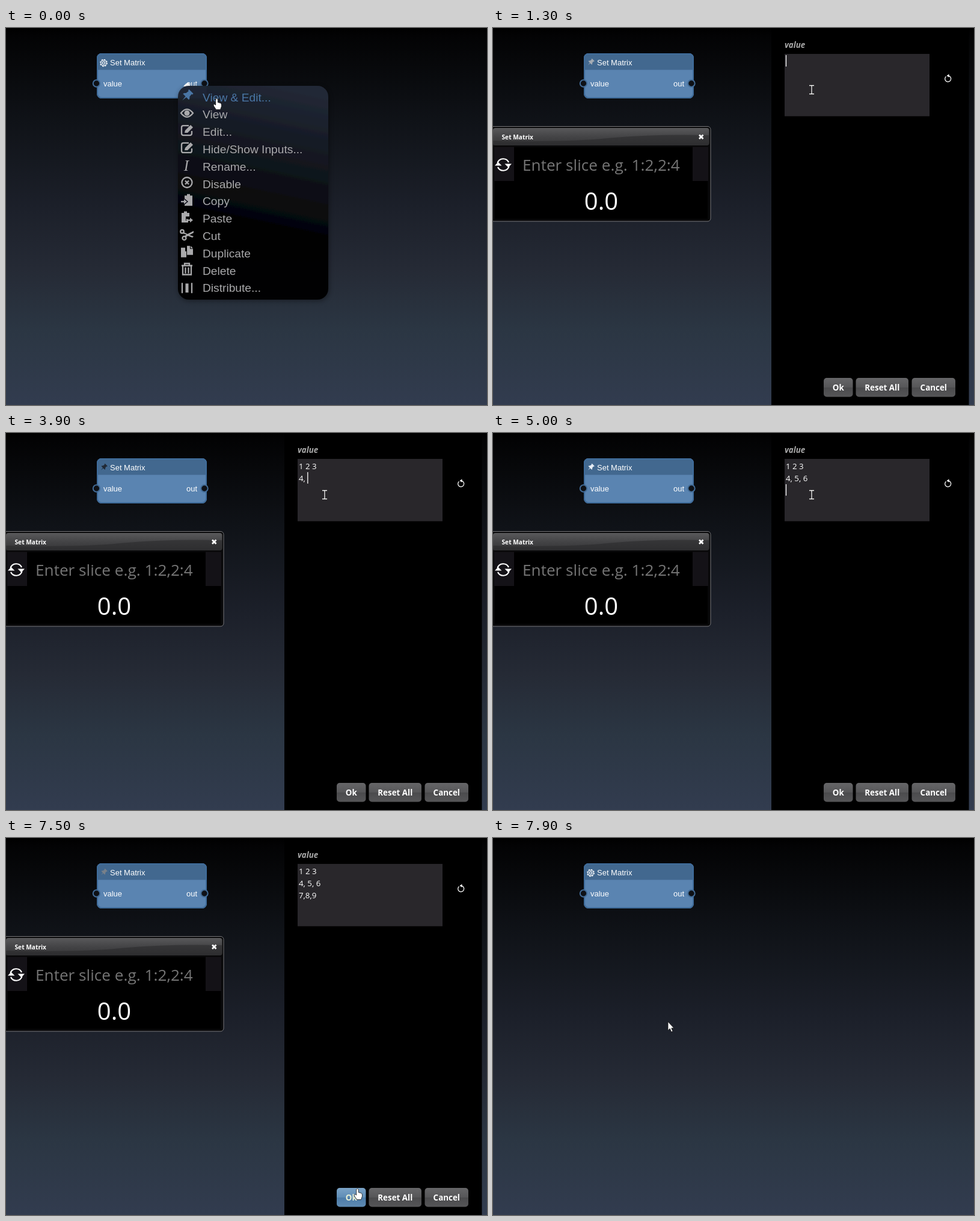
Write an HTML page that moves like this. It is 800 by 626 pixels and loops after 8 s.

```html
<!DOCTYPE html>
<html lang="en">
<head>
<meta charset="utf-8">
<title>Matrix node editor</title>
<style>
html, body { margin: 0; width: 100%; height: 100%; overflow: hidden; background: #000; }
svg { display: block; }
text { white-space: pre; fill: #fff; }
.node text { font: 13px "Liberation Sans", Arial, sans-serif; }
.ui { font-family: "Open Sans", "Noto Sans", sans-serif; }
.b { font-weight: 700; }
#menu text { font: 19.2px "Liberation Sans", Arial, sans-serif; fill: inherit; }
#menu text.serif { font: italic 25px "Liberation Serif", Times, serif; }
.line { fill: none; stroke: currentColor; stroke-width: 2.3; }
.cursor { fill: #fff; stroke: #111; stroke-width: .8; }
</style>
</head>
<body>
<svg width="800" height="626" viewBox="0 0 800 626">
  <defs>
    <linearGradient id="sky" x2="0" y2="1">
      <stop stop-color="#000"/><stop offset=".02" stop-color="#030304"/>
      <stop offset=".24" stop-color="#0f1217"/><stop offset=".48" stop-color="#1c202a"/>
      <stop offset=".64" stop-color="#252a35"/><stop offset=".8" stop-color="#2b3643"/>
      <stop offset="1" stop-color="#323c4f"/>
    </linearGradient>
    <linearGradient id="menuFill" x1=".6" x2=".45" y2="1">
      <stop stop-color="#222937"/><stop offset=".3" stop-color="#131720"/>
      <stop offset=".68" stop-color="#010102"/><stop offset="1" stop-color="#000"/>
    </linearGradient>
    <linearGradient id="bar" x2="0" y2="1">
      <stop stop-color="#59595b"/><stop offset=".5" stop-color="#444446"/><stop offset="1" stop-color="#343436"/>
    </linearGradient>
    <linearGradient id="btn" x2="0" y2="1">
      <stop stop-color="#666668"/><stop offset=".5" stop-color="#565658"/>
      <stop offset=".52" stop-color="#4b4b4d"/><stop offset="1" stop-color="#565658"/>
    </linearGradient>
    <linearGradient id="btnHot" x2="0" y2="1">
      <stop stop-color="#7ba3c6"/><stop offset=".5" stop-color="#5f8db6"/>
      <stop offset=".52" stop-color="#4d7ca8"/><stop offset="1" stop-color="#5f8bb3"/>
    </linearGradient>
    <filter id="shadow" x="-10%" y="-10%" width="120%" height="120%">
      <feDropShadow dx="1" dy="2" stdDeviation="4" flood-opacity=".4"/>
    </filter>
    <clipPath id="reveal"><rect id="revealBox" x="463" width="330" height="626"/></clipPath>
    <clipPath id="nodeClip"><rect x="151" y="42" width="183" height="75" rx="8"/></clipPath>
    <path id="pinShape" d="M-5-10H5V-7.5H3.5L4.2-2Q7 0 7 2.5H1L0 11L-1 2.5H-7Q-7 0-4.2-2L-3.5-7.5H-5Z" transform="rotate(45)"/>
  </defs>
  <rect width="800" height="626" fill="url(#sky)"/>

  <g class="node">
    <g clip-path="url(#nodeClip)">
      <path d="M151 42h183v75h-183z" fill="#5a84b1"/>
      <path d="M151 42h183v27.5h-183z" fill="#42688f"/>
    </g>
    <rect x="152" y="43" width="181" height="73" rx="7" fill="none" stroke="#3f6c9b" stroke-width="2"/>
    <g fill="#0e1116" stroke="#426b96" stroke-width="2">
      <circle cx="150.5" cy="92" r="5.7"/><circle cx="330" cy="92" r="5.7"/>
    </g>
    <text x="173" y="62">Set Matrix</text>
    <text x="162" y="97">value</text>
    <text x="318" y="97" text-anchor="end">out</text>
    <g id="gear" fill="none" stroke="#fff" transform="translate(162.5 58)">
      <circle r="2.1" stroke-width="1.1"/><circle r="4.6" stroke-width="1.1"/>
      <circle r="5.7" stroke-width="1.4" stroke-dasharray="2.2 2.277"/>
    </g>
    <use id="pin" href="#pinShape" transform="translate(162.5 57) scale(.6)"/>
  </g>

  <g id="viewer" class="ui">
    <rect x="-4" y="163.5" width="366" height="157.5" rx="5" fill="#080809" stroke="#77777a"/>
    <rect x="0" y="166" width="359.5" height="29" rx="4" fill="url(#bar)"/>
    <path d="M0 187Q120 190 190 183T359 178V191Q359 195 355 195H0Z" fill="#29292b" opacity=".55"/>
    <text class="b" x="14.5" y="184.5" font-size="10.2">Set Matrix</text>
    <path d="M343 177.500l6.500 6.500m0-6.500l-6.500 6.500" stroke="#fff" stroke-width="2.800"/>
    <path d="M2 197.500H358V254H2Z" fill="#141217"/>
    <path d="M35 197.500H332V254H35ZM3 254H357V317H3Z"/>
    <path d="M7.500 224A10 10 0 0 1 26 223M26.500 230A10 10 0 0 1 8 231" fill="none" stroke="#fff" stroke-width="2.200"/>
    <path d="M19.500 225.500H31L25.500 231.500ZM3 228.500H14.500L8.500 222.500Z" fill="#fff"/>
    <text x="49" y="237" font-size="26.2" style="fill:#757575">Enter slice e.g. 1:2,2:4</text>
    <text x="180" y="302" font-size="40" text-anchor="middle">0.0</text>
  </g>

  <g id="dialog" class="ui" clip-path="url(#reveal)">
    <path d="M463 0H791.500V626H463Z"/>
    <text class="b" x="485" y="33" font-size="13.3" font-style="italic" style="fill:#aaa">value</text>
    <path d="M485 43H726V146.500H485Z" fill="#29272b"/>
    <g id="lines" font-size="13.3"></g>
    <path id="caret" d="M0 0V19" stroke="#fff" stroke-width="1.3"/>
    <path d="M753.500 80.500A5 5 0 1 0 758 79.500" fill="none" stroke="#fff" stroke-width="1.300"/>
    <path d="M758.500 76.500V82L754.500 79.200Z" fill="#fff"/>
    <g id="buttons"></g>
  </g>

  <g id="menu">
    <path d="M295 97Q300 90 304 91L306 97Z" fill="#fff"/>
    <rect x="286" y="96" width="250" height="355" rx="18" fill="url(#menuFill)" opacity=".96" filter="url(#shadow)"/>
  </g>

  <g class="cursor">
    <path id="arrow" d="M0 0V14.500L3.300 11.500L5.500 17L8 16L5.800 10.800H10Z"/>
    <path id="hand" d="M-1.800 1.500Q0-1 1.800 1.500V6.500L6 7.500Q8 8.200 8 11V13L6 18.500H-1L-5 12.500Q-6 9.500-4 9.500L-1.800 11Z"/>
    <g id="beam" fill="none">
      <path d="M-4-7H4M0-7V7M-4 7H4" stroke="#000" stroke-width="3" opacity=".5"/>
      <path d="M-4-7H4M0-7V7M-4 7H4" stroke="#fff" stroke-width="1.300"/>
    </g>
  </g>
</svg>
<script>
const $ = id => document.getElementById(id);
const show = (id, on) => $(id).style.display = on ? '' : 'none';
const clamp = (v, lo = 0, hi = 1) => Math.min(hi, Math.max(lo, v));
const mix = (a, b, k) => a + (b - a) * k;
const swing = k => .5 - Math.cos(clamp(k) * Math.PI) / 2;

const LOOP = 8000, END = 7900;
const OPEN = 100, SLIDE = 120, FOCUS = 1200, TYPE = 1900, KEY = 230, BLUR = 7300;
const TEXT = '1 2 3\n4, 5, 6\n7,8,9';

// Menu entries with icons drawn around their own centre
const solid = d => `<path d="${d}" fill="currentColor"/>`;
const line = d => `<path d="${d}" class="line"/>`;
const ring = (x, y, r) => `<circle cx="${x}" cy="${y}" r="${r}" class="line"/>`;
const edit = line('M3-8H-6Q-9-8-9-5V5Q-9 8-6 8H5Q8 8 8 5V1') + solid('M-4 4L-3 0L6-9L10-5L1 4Z');
const items = [
  ['View & Edit...', '<use href="#pinShape" fill="currentColor"/>'],
  ['View', line('M-10 0Q0-13 10 0Q0 13-10 0Z') + solid('M-4.500 0A4.500 4.500 0 0 1 4.500 0A4.500 4.500 0 0 1-4.500 0Z')],
  ['Edit...', edit],
  ['Hide/Show Inputs...', edit],
  ['Rename...', '<text class="serif" x="-1" y="9" text-anchor="middle">I</text>'],
  ['Disable', ring(0, 0, 8.5) + line('M-3-3L3 3M3-3L-3 3')],
  ['Copy', solid('M-4-7H0V-9.500H5V-7H9V10H-4V8L2 3L-4-2Z') + line('M-10 3H-3') + solid('M-5-1L0 3L-5 7Z')],
  ['Paste', solid('M-9-7H-5V-9.500H0V-7H4V-1H-2V6H2V9H-9Z') + line('M0 3V5H6') + solid('M5 1L10 5L5 9Z')],
  ['Cut', ring(-8, -5, 2.8) + ring(-4.5, 6, 3) + solid('M-6-4L1-1L11-6L11-3L2 2L-3 5L-5 3L-1 0L-7-2ZM2 0L11 3L9 5L1 2Z')],
  ['Duplicate', solid('M-10-7H-3V-1H-1V9H-10ZM0-10H5V-5H10V5H0ZM6-10L10-6H6Z')],
  ['Delete', line('M-9-6H9M-4-6V-9.500H4V-6M-7-6V9H7V-6M-2.500-3V7M2.500-3V7')],
  ['Distribute...', '<g transform="translate(0 2)">' + line('M-8-8V9M8-8V9') + solid('M-2.500-7H2.500V8H-2.500Z') + '</g>'],
];
$('menu').innerHTML += items.map(([label, icon], i) => {
  const color = i ? '#a9a9ab' : '#4a76a5';
  return `<g color="${color}" fill="${color}">
    <g transform="translate(301 ${112.5 + 28.8 * i})">${icon}</g>
    <text x="327" y="${121.5 + 28.8 * i}">${label.replace('&', '&amp;')}</text></g>`;
}).join('');

$('buttons').innerHTML = [['Ok', 550, 48.5], ['Reset All', 603.5, 87.5], ['Cancel', 696.5, 72.5]].map(([label, x, w]) =>
  `<rect x="${x}" y="581" width="${w}" height="31.500" rx="5" fill="url(#btn)"/>
   <text class="b" x="${x + w / 2}" y="602" font-size="13.4" text-anchor="middle">${label}</text>`).join('');
const [okRect, okText] = $('buttons').children;

$('lines').innerHTML = [60, 80, 100].map(y => `<text x="487" y="${y}"></text>`).join('');
const rows = [...$('lines').children];

// Pointer path as [time, x, y]
const route = [
  [0, 350.5, 117], [99, 350.5, 117], [100, 352, 117], [600, 352, 117], [1100, 530, 102.5],
  [6450, 530, 102.5], [6950, 638, 555], [7200, 584.5, 582], [7899, 584.5, 582], [7900, 291, 305],
];
function pointerAt(t) {
  const i = route.findIndex(p => p[0] > t);
  if (i < 0) return route.at(-1).slice(1);
  const [t0, x0, y0] = route[i - 1], [t1, x1, y1] = route[i];
  const k = swing((t - t0) / (t1 - t0));
  return [mix(x0, x1, k), mix(y0, y1, k)];
}

function typeText(t) {
  const count = clamp(Math.floor((t - TYPE) / KEY) + 1, 0, TEXT.length);
  const typed = TEXT.slice(0, count).split('\n');
  rows.forEach((row, i) => row.textContent = typed[i] || '');
  const last = typed.length - 1;
  const since = t - (count ? TYPE + (count - 1) * KEY : FOCUS);
  show('caret', t >= FOCUS && t < BLUR && Math.floor(since / 530) % 2 === 0);
  const x = 487.5 + (typed[last] ? rows[last].getComputedTextLength() : 0);
  $('caret').setAttribute('transform', `translate(${x} ${45 + 20 * last})`);
}

function draw(now) {
  const t = now % LOOP;
  const open = t >= OPEN && t < END;
  show('menu', t < OPEN);
  show('gear', !open);
  show('pin', open);
  show('viewer', open);
  show('dialog', open);

  const glow = 1 - Math.abs(t / 1000 % 2 - 1);
  $('pin').setAttribute('fill', `rgb(${mix(12, 229, glow)} ${mix(20, 236, glow)} ${mix(32, 244, glow)})`);
  $('revealBox').setAttribute('height', 626 * swing((t - SLIDE) / 400));
  typeText(t);

  const [x, y] = pointerAt(t);
  const onOk = open && x > 550 && x < 598.5 && y > 581;
  const inField = open && x > 485 && x < 726 && y > 43 && y < 146;
  const kind = t < OPEN || onOk ? 'hand' : inField ? 'beam' : 'arrow';
  for (const id of ['arrow', 'hand', 'beam']) show(id, id === kind);
  $(kind).setAttribute('transform', `translate(${x} ${y})`);
  okRect.setAttribute('fill', onOk ? 'url(#btnHot)' : 'url(#btn)');
  okText.style.fill = onOk ? '#e9f1d6' : '#fff';
}

const start = performance.now();
(function tick() {
  draw(performance.now() - start);
  requestAnimationFrame(tick);
})();
</script>
</body>
</html>
```
